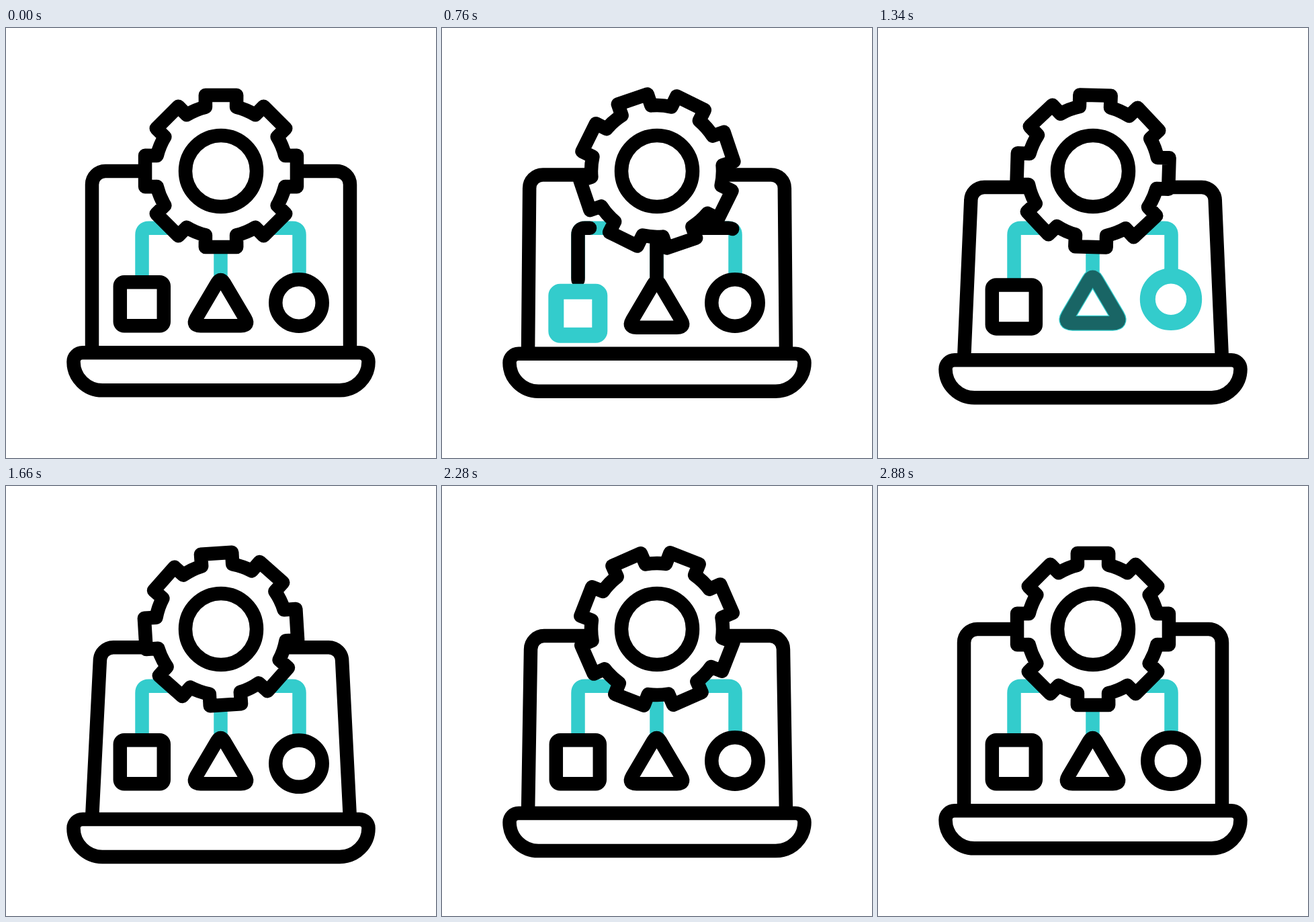
Recreate the animation shown at these times as an HTML page. Size 640 by 640 pixels, loop 3.2 s.

```html
<!DOCTYPE html>
<html lang="en">
<head>
<meta charset="utf-8">
<title>Gear and shapes on a laptop</title>
<style>
  html, body { margin: 0; width: 100%; height: 100%; overflow: hidden; background: #fff; }
  svg { display: block; width: 100vw; height: 100vh; }
  .ink { stroke: #000; stroke-width: 20.5; }
  .teal { stroke: #33cccc; stroke-width: 20.5; }
  .glow { stroke: #33cccc; stroke-width: 23; }
  .pulse { stroke-linecap: round; }
</style>
</head>
<body>
<svg viewBox="0 0 640 640" fill="none" stroke-linejoin="round">
  <path id="screen" class="ink"/>
  <g id="wires"></g>
  <path id="gear" class="ink" fill="#fff"/>
  <circle class="ink" cx="320" cy="213" r="53"/>
  <g id="shapes"></g>
  <path id="base" class="ink" fill="#fff" d="M114 483.3H526A13.5 13.5 0 0 1 539.5 496.8
    A43 42.5 0 0 1 496.5 539.3H143.5A43 42.5 0 0 1 100.5 496.8A13.5 13.5 0 0 1 114 483.3Z"/>
</svg>
<script>
const LOOP = 3200, MOVE_END = 2880, STEP = 20;
const $ = id => document.getElementById(id);

function add(parent, tag, attrs) {
  const node = document.createElementNS('http://www.w3.org/2000/svg', tag);
  for (const name in attrs) node.setAttribute(name, attrs[name]);
  return parent.appendChild(node);
}

// Progress from 0 to 1 between two times: linear, eased at both ends, eased at the end.
const ramp = (t, from, to) => Math.min(1, Math.max(0, (t - from) / (to - from)));
const ease = (t, from, to) => { const u = ramp(t, from, to); return u * u * (3 - 2 * u); };
const settle = (t, from, to) => 1 - (1 - ramp(t, from, to)) ** 3;

const gearAngle = t => -48.5 * (ease(t, 100, 1660) - ease(t, 1660, MOVE_END));

// The laptop tips back, slowly forward, back again and then to rest.
const rock = (t, back, forward) =>
  back * (ease(t, 0, 440) - ease(t, 2480, MOVE_END)) +
  (forward - back) * (settle(t, 440, 2090) - ease(t, 2120, 2480));

// A pushed shape swings to these offsets in turn.
const push = t =>
  14.3 * ease(t, 560, 780) - 21.3 * ease(t, 780, 1120) +
  11.3 * ease(t, 1120, 1360) - 4.3 * ease(t, 1360, 1520);

function gearPath() {
  const at = (degrees, radius) => {
    const a = degrees * Math.PI / 180;
    return `${320 + radius * Math.sin(a)} ${213 - radius * Math.cos(a)}`;
  };
  let d = `M${at(-13.6, 98)}`;
  for (let tooth = 0; tooth < 360; tooth += 45) {
    d += `L${at(tooth - 11.6, 115.3)}L${at(tooth + 11.6, 115.3)}L${at(tooth + 13.6, 98)}`;
    d += `A98 98 0 0 1 ${at(tooth + 31.4, 98)}`;
  }
  return d + 'Z';
}
$('gear').setAttribute('d', gearPath());

const branches = [
  { start: 'M262 297.8H212.5Q202.5 297.8 202.5 308', tag: 'rect',
    shape: { x: 169.8, y: 378.3, width: 65, height: 65, rx: 6 } },
  { start: 'M319.5 310', tag: 'path',
    shape: { d: 'M314.2 379.4Q319.5 370.4 324.8 379.4L355.9 432Q362.5 443.2 349.5 443.2H289.5Q276.5 443.2 283.1 432Z' } },
  { start: 'M377 297.8H426.5Q436.5 297.8 436.5 308', tag: 'circle',
    shape: { cx: 436, cy: 409, r: 34.7 } }
].map(({ start, tag, shape }, i) => {
  add($('wires'), 'path', { class: 'teal', d: `${start}V373` });
  const pulse = add($('wires'), 'path', { class: 'ink pulse', d: `${start}V375` });
  const group = add($('shapes'), 'g', {});
  return {
    delay: i * 140, pulse, group, length: pulse.getTotalLength(),
    glow: add(group, tag, { class: 'glow', ...shape }),
    ink: add(group, tag, { class: 'ink', ...shape })
  };
});

function drawBranch({ delay, pulse, group, length, glow, ink }, time) {
  const t = time - delay;
  const tip = ramp(t, 380, 620), tail = ramp(t, 700, 890);
  pulse.style.display = tip > tail ? '' : 'none';
  pulse.setAttribute('stroke-dasharray', `${(tip - tail) * length} 999`);
  pulse.setAttribute('stroke-dashoffset', -tail * length);

  const heat = ramp(t, 620, 700) - ramp(t, 1120, 1280);
  glow.setAttribute('opacity', Math.min(1, heat * 2));
  ink.setAttribute('opacity', 1 - heat);
  group.setAttribute('transform', `translate(0 ${push(t)})`);
}

function draw(time) {
  const drop = rock(time, -9.2, 13), lift = rock(time, -15, 28);
  const inset = lift * (0.38 + 0.002 * lift);
  const left = 128 + inset, right = 512 - inset, top = 213 + lift, foot = 483 + drop;
  $('screen').setAttribute('d', `M128 ${foot}L${left} ${top + 20}
    A20 20 0 0 1 ${left + 20} ${top}H${right - 20}A20 20 0 0 1 ${right} ${top + 20}L512 ${foot}`);
  $('base').setAttribute('transform', `translate(0 ${drop})`);
  $('gear').setAttribute('transform', `rotate(${gearAngle(time)} 320 213)`);
  branches.forEach(branch => drawBranch(branch, time));
}

const began = performance.now();
function tick() {
  const time = (performance.now() - began) % LOOP;
  draw(Math.floor(time / STEP) * STEP);
  requestAnimationFrame(tick);
}
tick();
</script>
</body>
</html>
```
